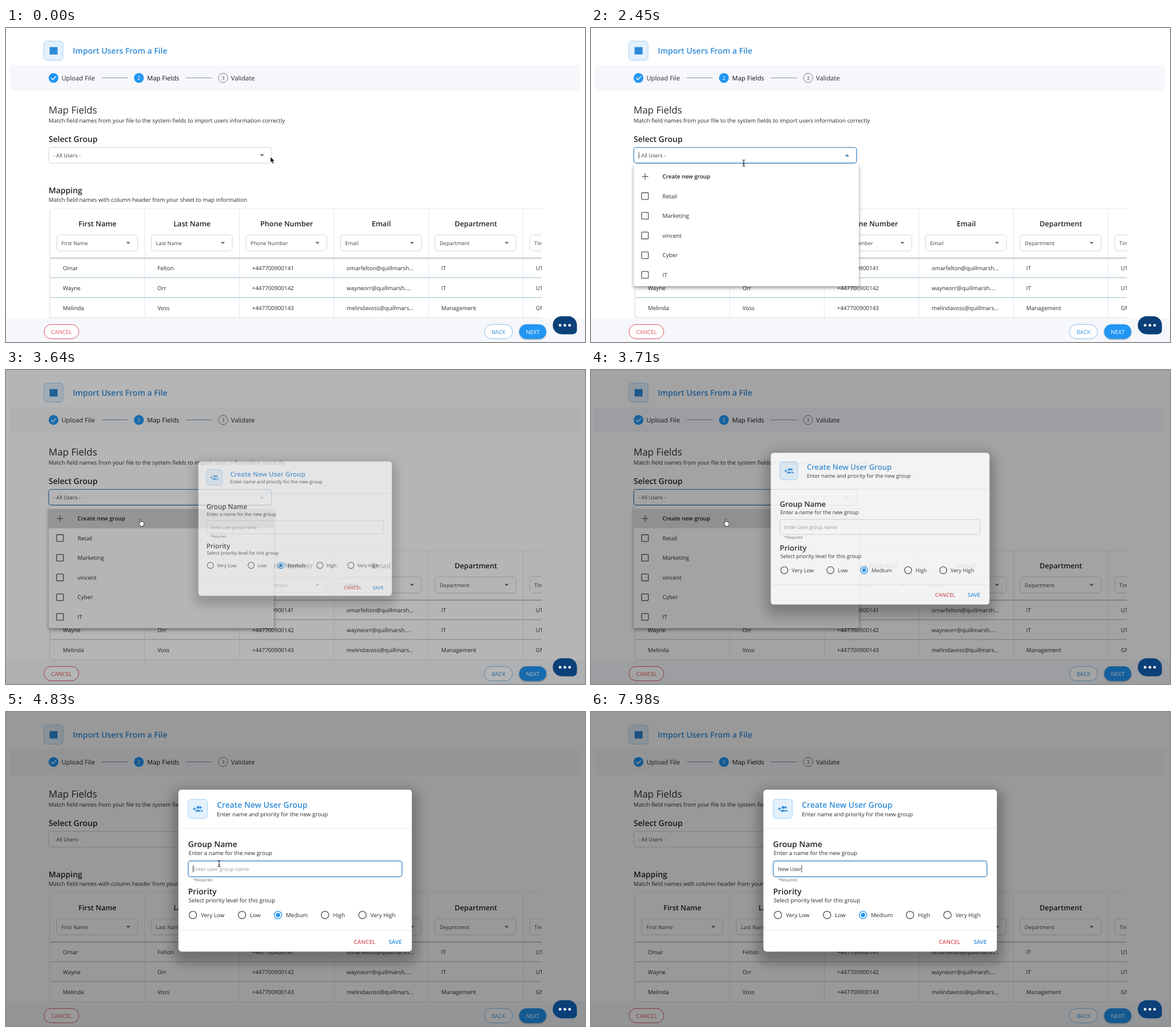
An HTML page for the animation above (8000 ms loop, 1016x551 px).

```html
<!DOCTYPE html>
<html lang="en">
<head>
<meta charset="utf-8">
<title>Import users</title>
<style>
html, body { margin: 0; width: 100%; height: 100%; overflow: hidden; background: #fff }
svg { display: block; width: 1016px; height: 551px; font-family: "Open Sans", "Noto Sans", sans-serif; text-rendering: geometricPrecision }
</style>
</head>
<body>
<svg id="stage" viewBox="0 0 1016 551"></svg>
<script>
const INK = '#2b2b2b', BLUE = '#2196f3', TITLE = '#2d8ad8', FOCUS = '#3079b8', EDGE = '#cfd3d8', RED = '#e0525a';

// Text is placed by the middle of its capitals.
const text = (x, y, s, size = 9.9, { fill = INK, weight = 400, anchor = 'start', id = '' } = {}) =>
  `<text id="${id}" x="${x}" y="${y + size * .36}" font-size="${size}" fill="${fill}" font-weight="${weight}" text-anchor="${anchor}">${s}</text>`;
const rect = (x, y, w, h, r, fill, stroke = 'none', more = '') =>
  `<rect x="${x}" y="${y}" width="${w}" height="${h}" rx="${r}" fill="${fill}" stroke="${stroke}" ${more}/>`;
const line = (d, stroke, width = 1) => `<path d="${d}" stroke="${stroke}" stroke-width="${width}" fill="none"/>`;
const circle = (x, y, r, fill, stroke = 'none', width = 1) =>
  `<circle cx="${x}" cy="${y}" r="${r}" fill="${fill}" stroke="${stroke}" stroke-width="${width}"/>`;
const arrow = (x, y, id = '') => `<path id="${id}" d="M${x - 3.7} ${y - 1.8}h7.4l-3.7 3.7z" fill="#666"/>`;
const semi = { weight: 600, fill: '#222' };
const mid = (weight, fill) => ({ weight, fill, anchor: 'middle' });
const iconBox = (x, y) => rect(x, y, 33.5, 33.5, 5, '#e3f1fd', '#a3cff3');

const columns = ['First Name', 'Last Name', 'Phone Number', 'Email', 'Department', 'Time Zone'];
const people = [
  ['Omar', 'Felton', '+447700900141', 'omarfelton@quillmarsh...', 'IT', 'UTC'],
  ['Wayne', 'Orr', '+447700900142', 'wayneorr@quillmarsh....', 'IT', 'UTC'],
  ['Melinda', 'Voss', '+447700900143', 'melindavoss@quillmars...', 'Management', 'GMT']
];

const header = () =>
  iconBox(66.5, 23) + rect(76.5, 33.5, 14, 13, 0, TITLE) +
  text(117.3, 39.8, 'Import Users From a File', 14, { weight: 600, fill: TITLE }) +
  rect(7, 65, 1000, 45, 0, '#f5f7fb') +
  circle(83.4, 87.6, 8.6, BLUE) + line('M79.2 87.8l3 3l5.6-6', '#fff', 1.4) + text(97.4, 87.6, 'Upload File', 11.25) +
  line('M168 87.5h46M315.5 87.5h46', '#8d939a') +
  circle(233.2, 87.6, 8.6, BLUE) + text(233.2, 87.6, 2, 9, mid(400, '#fff')) +
  text(247.6, 87.6, 'Map Fields', 11.25, { fill: '#111' }) +
  circle(381, 87.6, 8.1, 'none', '#777') + text(381, 87.6, 3, 9, mid(400, '#555')) + text(394.8, 87.6, 'Validate', 11.25);

const table = () => {
  const cell = (name, i) => {
    const x = 77.5 + i * 166;
    return (i ? line(`M${x} 317.5V508`, '#e3e7eb') : '') +
      text(x + 83, 343, name, 12.6, mid(600, '#222')) +
      rect(x + 11.5, 363, 142, 28, 4.5, '#fff', EDGE) +
      text(x + 19.6, 377.2, name, 9.2, { fill: '#444' }) + arrow(x + 137, 377.2) +
      people.map((p, row) => text(x + 22.3, 421.5 + row * 34.8, p[i])).join('');
  };
  return `<g clip-path="url(#tableClip)">` +
    rect(77.5, 317.5, 900, 190.5, 5, '#fff', '#eceff2', 'style="filter:drop-shadow(0 1px 1.5px #0003)"') +
    columns.map(cell).join('') +
    line('M78 403.8H940', '#b3b5b8', 1.4) + line('M78 438.3H940M78 473H940', '#bccfdd', 1.5) + '</g>';
};

const page = () => header() +
  text(74.8, 144.3, 'Map Fields', 17) +
  text(74.8, 162.5, 'Match field names from your file to the system fields to import users information correctly') +
  text(74.8, 195.2, 'Select Group', 14, semi) +
  rect(75, 209.5, 391, 27.7, 4.5, '#fff', EDGE, 'id="select"') +
  text(83, 223.4, '- All Users -', 9.2, { fill: '#444' }) + arrow(449.3, 223.4, 'selectArrow') +
  `<path id="selectCaret" d="M84 217.5v12" stroke="#555"/>` +
  text(74.8, 285.2, 'Mapping', 14, semi) +
  text(74.8, 301, 'Match field names with column header from your sheet to map information') +
  table() +
  rect(0, 509, 1016, 42, 0, '#f5f7fb') +
  rect(66.8, 520.3, 61, 25, 12.5, '#fff', RED) + text(97.3, 533, 'CANCEL', 9.9, mid(500, RED)) +
  rect(839.5, 520.3, 49.3, 25, 12.5, '#fff', '#82bdea') + text(864.2, 533, 'BACK', 9.9, mid(500, '#3495dd')) +
  rect(900.5, 520, 47.5, 25.8, 12.9, BLUE, 'none', 'style="filter:drop-shadow(0 1px 1.5px #0005)"') +
  text(924.4, 533, 'NEXT', 9.9, mid(500, '#fff'));

const menu = () => '<g id="menu">' +
  rect(75, 238, 395, 215, 3, '#fff', 'none', 'style="filter:drop-shadow(0 3px 3px #0006)"') +
  rect(75, 243.7, 395, 34, 0, '#c2c2c2', 'none', 'id="hover"') +
  line('M89.5 260.6h11M95 255.1v11', '#555', 1.2) + text(125.6, 260.6, 'Create new group', 9.8, semi) +
  ['Retail', 'Marketing', 'vincent', 'Cyber', 'IT'].map((s, i) => {
    const y = 295.1 + i * 34.6;
    return rect(88.8, y - 6.1, 11.8, 11.8, 1, 'none', '#555', 'stroke-width="1.3"') + text(125.6, y, s);
  }).join('') + '</g>';

const levels = [[328, 'Very Low'], [414.2, 'Low'], [477.3, 'Medium'], [559.8, 'High'], [625.5, 'Very High']];
const dialog = () => '<g id="dialog">' +
  rect(300, 145, 415, 288, 12, '#000', 'none', 'opacity=".14" style="filter:blur(9px)"') +
  rect(288, 130, 438, 316, 24, '#000', 'none', 'opacity=".15" style="filter:blur(9px)"') +
  rect(302.5, 136.2, 409.7, 284.3, 5.6, '#fff') +
  iconBox(319.7, 153.2) +
  line('M328 170h5.4M330.7 167.3v5.4', TITLE, 1.4) +
  circle(337, 167.4, 2.3, TITLE) + circle(341.3, 167.4, 2, TITLE) +
  `<path d="M332.4 174.8c0-4.4 9-4.4 9 0zM342.4 174.8c0-1.5-.4-2.4-1.2-3.2c2 0 4.3 1 4.3 3.2z" fill="${TITLE}"/>` +
  text(370, 163.4, 'Create New User Group', 14, { weight: 600, fill: TITLE }) +
  text(370, 179.2, 'Enter name and priority for the new group') +
  line('M302.5 204.3h409.7M302.5 383.5h409.7', '#e6e8ea') +
  text(319.5, 231.9, 'Group Name', 14, semi) + text(320.4, 247.7, 'Enter a name for the new group') +
  rect(319.7, 261.3, 375.2, 27.8, 4.5, '#fff', EDGE, 'id="input"') +
  text(327.8, 275.4, 'Enter user group name', 9.2, { id: 'value' }) +
  '<path id="caret" d="M0 269v12.5" stroke="#444"/>' +
  text(328, 294.4, '*Required', 7.1, { fill: '#666' }) +
  text(319.5, 314.7, 'Priority', 14, semi) + text(320.4, 330.3, 'Select priority level for this group') +
  levels.map(([x, s], i) => circle(x, 356.2, 6.6, 'none', i == 2 ? BLUE : '#555', 1.4) +
    (i == 2 ? circle(x, 356.2, 3.7, BLUE) : '') + text(x + 13.9, 356.4, s)).join('') +
  text(629.2, 403, 'CANCEL', 9.9, mid(600, '#d9535b')) + text(683, 403, 'SAVE', 9.9, mid(600, TITLE)) + '</g>';

const chat = () =>
  '<path d="M975.3 505.7h11a15.5 15.5 0 0 1 15.5 15.5v9a7.2 7.2 0 0 1-7.2 7.2h-19.3a15.8 15.8 0 0 1 0-31.7z" fill="#0b4079"/>' +
  [972.3, 980.7, 989].map(x => circle(x, 521.7, 2.4, '#fff')).join('');

const pointers = {
  arrow: '<path d="M0 0v10.4l2.4-2.2l1.7 4l1.9-.8l-1.7-3.8h3.3z" fill="#000" stroke="#fff" stroke-width=".8"/>',
  beam: line('M-2.6-5.5q2.2 0 2.6 1.2q.4-1.2 2.6-1.2M-2.6 5.5q2.2 0 2.6-1.2q.4 1.2 2.6 1.2M0-4.5v9M-1.3 1.6h2.6', '#222', 1.1),
  hand: '<path d="M-2.4 1.2v-5.6q0-1.2 1-1.2t1 1.2v3.2q1.3-.7 1.8.3q1.3-.5 1.7.5q1.5-.2 1.5 1.2v2q0 1.6-1.2 2.8v1.2h-5v-1.2l-2.8-3.6q-.8-1.2.2-1.7q.8-.2 1.8.9z" fill="#fff" stroke="#111" stroke-width=".8"/>'
};

stage.innerHTML = '<clipPath id="tableClip"><path d="M70 310H940V512H70z"/></clipPath>' +
  page() + menu() + rect(0, 0, 1016, 551, 0, '#000', 'none', 'id="shade"') + dialog() + chat() +
  '<g id="pointer"></g>';

const el = id => document.getElementById(id);
const set = (id, attrs) => { for (const k in attrs) el(id).setAttribute(k, attrs[k]); };
const ramp = (t, from, to) => Math.min(1, Math.max(0, (t - from) / (to - from)));

const path = [[0, 464, 226], [70, 448, 230], [210, 448, 236], [700, 446, 235], [1120, 401, 231], [2100, 401, 231],
  [2450, 268, 237], [2700, 246, 253], [2940, 238, 266], [3010, 237.5, 267.5], [4480, 237.5, 267.5], [4690, 374, 266], [8000, 374, 266]];
const looks = [[0, 'arrow'], [210, 'hand'], [770, 'beam'], [3010, 'hand'], [4550, 'arrow'], [4690, 'beam'], [5390, '']];
const typing = [[0, ''], [5390, 'N'], [5600, 'Ne'], [5740, 'New'], [5950, 'New '], [6300, 'New U'], [6440, 'New Us'],
  [6580, 'New Use'], [6790, 'New User'], [7140, 'New Use'], [7350, 'New Us'], [7630, 'New Use'], [7840, 'New User']];
const latest = (list, t) => list.filter(k => k[0] <= t).pop()[1];

function place(t) {
  const i = path.findIndex(k => k[0] > t), a = path[i - 1], b = path[i], u = ramp(t, a[0], b[0]);
  return [1, 2].map(n => a[n] + (b[n] - a[n]) * u);
}

function draw(t) {
  const focused = t >= 1260 && t < 4690;
  set('select', { stroke: focused ? FOCUS : EDGE, 'stroke-width': focused ? 1.2 : 1 });
  set('selectArrow', { fill: focused ? FOCUS : '#666', transform: focused ? 'rotate(180 449.3 223.4)' : '' });
  set('selectCaret', { opacity: +(focused && t < 3290 && (t - 1260) % 1060 < 530) });

  const open = 1 - (1 - ramp(t, 1400, 1750)) ** 3;
  set('menu', {
    opacity: open * (1 - ramp(t, 4620, 4830)),
    transform: `translate(0 238) scale(1 ${.6 + .4 * open}) translate(0 -238)`
  });
  set('hover', { opacity: ramp(t, 3220, 3360) * (1 - ramp(t, 3570, 3850)) });

  const ease = start => t < 3640 ? 0 : t > 4300 ? 1 : 1 - Math.exp((start - t) / 70);
  const shown = ease(3565), scale = .5 + shown / 2;
  set('shade', { opacity: .4 * ease(3550) });
  set('dialog', { opacity: shown, transform: `translate(507.3 278.3) scale(${scale}) translate(-507.3 -278.3)` });

  const active = t >= 4690, typed = latest(typing, t).replace(' ', '\u00a0');
  set('input', { stroke: active ? FOCUS : EDGE, 'stroke-width': active ? 1.2 : 1 });
  el('value').textContent = typed || 'Enter user group name';
  set('value', { fill: typed ? '#333' : '#9a9a9a' });
  const caretX = 328.3 + (typed ? el('value').getComputedTextLength() : 0);
  set('caret', { transform: `translate(${caretX})`, opacity: +(active && (t >= 5390 || (t - 4690) % 840 < 420)) });

  el('pointer').innerHTML = pointers[latest(looks, t)] || '';
  set('pointer', { transform: `translate(${place(t)})` });
}

function tick() {
  draw(Math.floor(performance.now() % 8000 / 70) * 70);
  requestAnimationFrame(tick);
}
tick();
</script>
</body>
</html>
```
